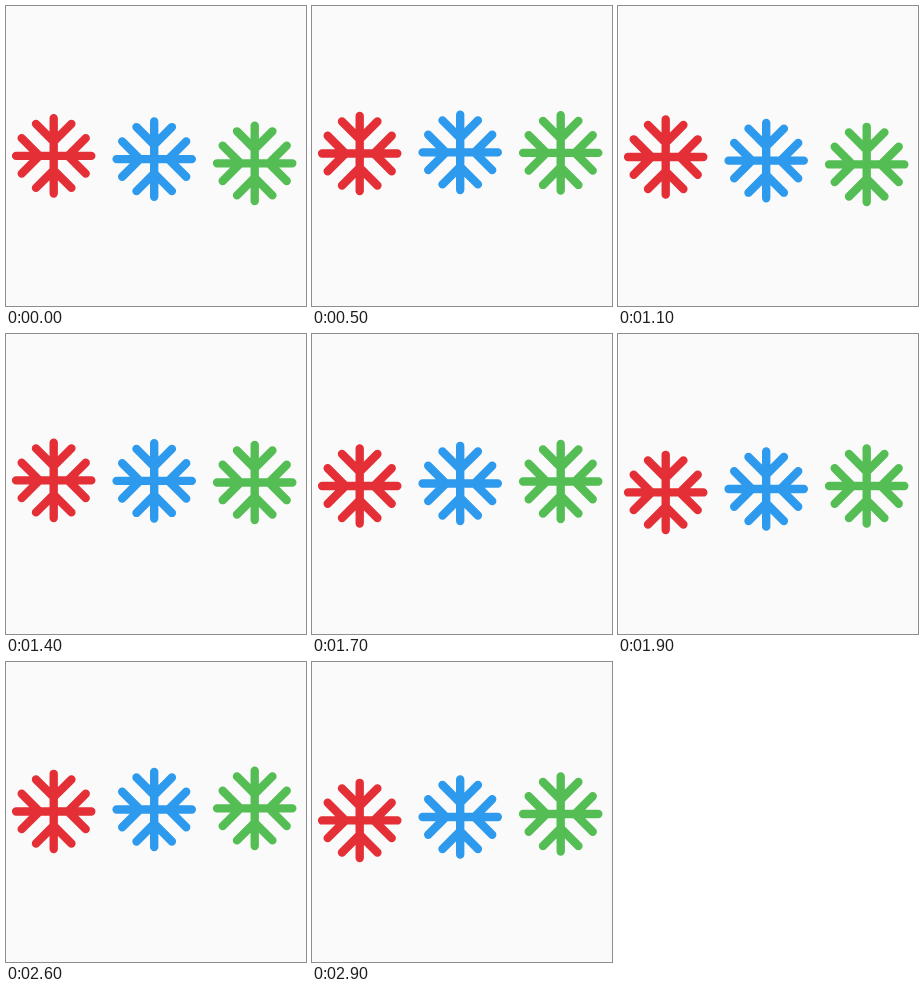
An HTML page with a canvas for the animation above (3000 ms loop, 300x300 px).

```html
<!DOCTYPE html>
<html lang="en">
<head>
<meta charset="utf-8">
<title>Bouncing snowflakes</title>
<style>
  html, body { margin: 0; width: 100%; height: 100%; overflow: hidden; background: #fafafa; }
  canvas { display: block; width: 300px; height: 300px; }
</style>
</head>
<body>
<canvas id="stage" width="300" height="300"></canvas>
<script>
const ctx = document.getElementById('stage').getContext('2d');
const LOOP = 3000, STEP = 100;
const PERIOD = 1000, RISE = 490, DELAY = 100, OFFSET = 90;
const TOP = 146.4, DROP = 12.4;
const HEAD_START = 140, SETTLE = 500;
const COLORS = ['#e42f36', '#2d9aee', '#54be55'];
const FIRST_X = 47.7, SPACING = 100.5, UNIT = 4.18;

// Centre height: decelerating rise, then accelerating fall
function bounceY(time) {
  const t = (time + PERIOD) % PERIOD;
  const depth = t < RISE
    ? (1 - t / RISE) ** 2
    : ((t - RISE) / (PERIOD - RISE)) ** 1.5;
  return TOP + DROP * depth;
}

function drawFlake(x, y, color) {
  ctx.save();
  ctx.translate(x, y);
  ctx.scale(UNIT, UNIT);
  ctx.strokeStyle = color;
  ctx.lineWidth = 2;
  ctx.lineCap = ctx.lineJoin = 'round';
  ctx.beginPath();
  for (let arm = 0; arm < 4; arm++) {
    ctx.moveTo(0, 0);
    ctx.lineTo(0, -9);
    ctx.moveTo(-4.24, -7.66);
    ctx.lineTo(0, -3.42);
    ctx.lineTo(4.24, -7.66);
    ctx.rotate(Math.PI / 2);
  }
  ctx.stroke();
  ctx.restore();
}

function draw(elapsed) {
  const time = Math.floor((elapsed % LOOP) / STEP) * STEP;
  // Each loop opens partway into the rise and settles into the steady rhythm
  const phase = time + OFFSET + HEAD_START * Math.max(0, 1 - time / SETTLE);
  ctx.fillStyle = '#fafafa';
  ctx.fillRect(0, 0, 300, 300);
  COLORS.forEach((color, i) =>
    drawFlake(FIRST_X + i * SPACING, bounceY(phase - i * DELAY), color));
}

let start;
function tick(now) {
  start ??= now;
  draw(Math.max(0, now - start));
  requestAnimationFrame(tick);
}
draw(0);
requestAnimationFrame(tick);
</script>
</body>
</html>
```
